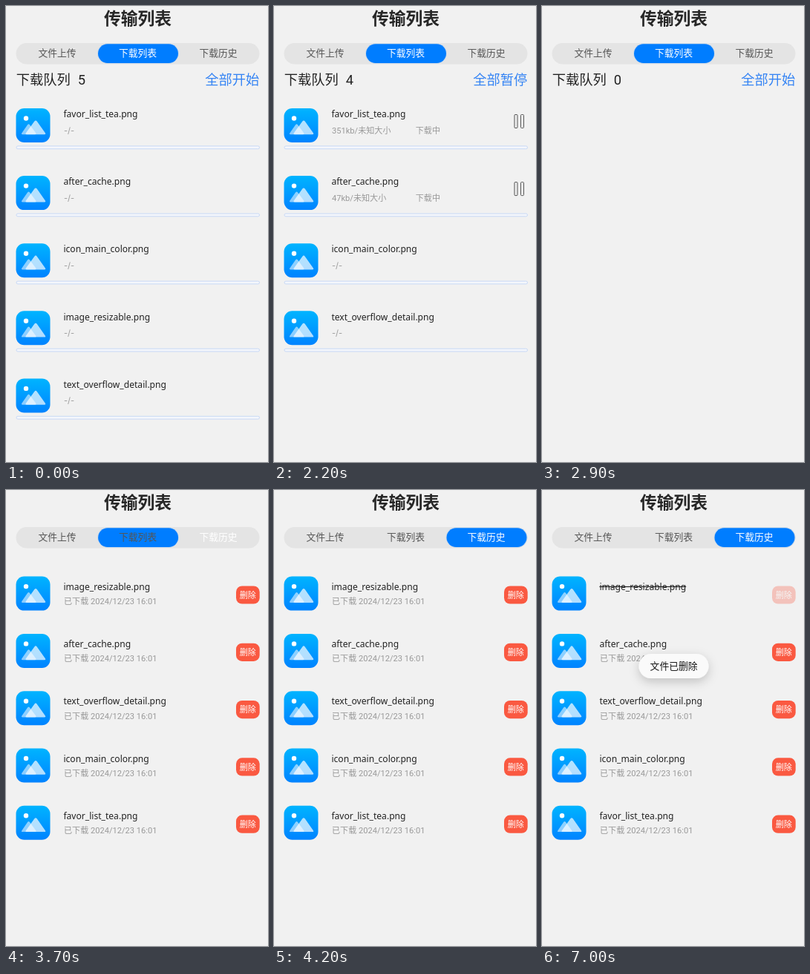
Recreate the animation shown at these times as an HTML page. Size 353 px wide and 615 px high, loop 8 s.

```html
<!DOCTYPE html>
<html lang="zh-CN">
<head>
<meta charset="utf-8">
<title>传输列表</title>
<style>
  html, body { margin: 0; width: 100%; height: 100%; overflow: hidden; background: #f1f1f1; }
  svg { display: block; width: 100%; height: 100%; font-family: Roboto, "Noto Sans CJK SC", "Noto Sans CJK", sans-serif; }
  text { white-space: pre; }
  .title { font-size: 22.8px; font-weight: 700; fill: #272727; }
  .tab { font-size: 12.8px; fill: #555; }
  .on { font-weight: 500; fill: #fff; }
  .head { font-size: 18.25px; fill: #222; }
  .link { fill: #3584f4; }
  .name { font: 12.1px "Noto Sans", sans-serif; fill: #222; }
  .gone { text-decoration: line-through; }
  .info { font-size: 11.1px; fill: #999; }
  .idle { font-family: Inter, sans-serif; }
  .del { font-size: 11px; font-weight: 500; fill: #fff; }
  .toast { font-size: 12.8px; fill: #151515; }
  .mid { text-anchor: middle; }
</style>
</head>
<body>
<svg viewBox="0 0 353 615">
  <defs>
    <linearGradient id="sky" x2="0" y2="1">
      <stop stop-color="#00b4ff"/>
      <stop offset="1" stop-color="#0083ff"/>
    </linearGradient>
    <filter id="lift" x="-40%" y="-100%" width="180%" height="300%">
      <feDropShadow dx="0" dy="4.5" stdDeviation="7" flood-opacity=".2"/>
    </filter>
    <g id="pic">
      <rect width="46" height="46" rx="11" fill="url(#sky)"/>
      <circle cx="13.5" cy="13.5" r="3.2" fill="#fff"/>
      <path d="M9 35.300q-2.600 0-1-2.200l7.500-10.800q1.500-2 3 0l8 10.800q1.400 2.200-1 2.200z" fill="#fff" opacity=".55"/>
      <path d="M14.500 35.300q-2.600 0-1-2.200l11.300-15.600q1.700-2.200 3.400 0l11 15.600q1.500 2.200-1 2.200z" fill="#fff" opacity=".7"/>
    </g>
    <g id="bar">
      <rect x="14" y="50.900" width="327.500" height="3.800" rx="1.900" fill="#f4f6fb" stroke="#c8d9f6"/>
    </g>
    <g id="pause" fill="none" stroke="#555">
      <rect x="324" y="8.500" width="4" height="18" rx="1"/>
      <rect x="332.500" y="8.500" width="4" height="18" rx="1"/>
    </g>
  </defs>
  <text class="title mid" x="177.500" y="24.900">传输列表</text>
  <rect x="13.500" y="50" width="328" height="28.500" rx="14.250" fill="#e4e4e4"/>
  <rect id="pill" y="51.300" width="108" height="25.600" rx="12.800" fill="#007dff" stroke="#cddbea" stroke-width="2" paint-order="stroke"/>
  <g id="tabs"></g>
  <g id="page"></g>
  <g id="tip"></g>
</svg>
<script>
const LOOP = 8000, STEP = 100;
const START = 1000, ACTIVE = 2000, SWITCH = 3700, EXISTS = 5800, REMOVE = 6900;

const files = [
  { name: 'favor_list_tea.png', kb: 351, from: ACTIVE, to: 2900 },
  { name: 'after_cache.png', kb: 47, from: ACTIVE, to: 2300 },
  { name: 'icon_main_color.png', kb: 112, from: 2400, to: 2700 },
  { name: 'image_resizable.png', kb: 64, from: ACTIVE, to: 2200 },
  { name: 'text_overflow_detail.png', kb: 38, from: 2300, to: 2400 }
];
const finished = [...files].sort((a, b) => a.to - b.to);

const $ = id => document.getElementById(id);
const text = (cls, x, y, s) => `<text class="${cls}" x="${x}" y="${y}">${s}</text>`;
const use = id => `<use href="#${id}"/>`;
const row = (y, body) => `<g transform="translate(0 ${y})"><g transform="translate(13.5 0)">${use('pic')}</g>${body}</g>`;

// cubic ease-in-out with control points (.42, 0) and (.58, 1)
function ease(x) {
  if (x <= 0) return 0;
  if (x >= 1) return 1;
  let lo = 0, hi = 1, u;
  for (let i = 0; i < 20; i++) {
    u = (lo + hi) / 2;
    const bx = 3 * u * (1 - u) * (.42 * (1 - u) + .58 * u) + u ** 3;
    if (bx < x) lo = u; else hi = u;
  }
  return u * u * (3 - 2 * u);
}

function tabs(active) {
  return ['文件上传', '下载列表', '下载历史']
    .map((s, i) => text('tab mid' + (i === active ? ' on' : ''), 69 + i * 108.5, 68.3, s))
    .join('');
}

function queue(t) {
  const left = files.filter(f => t < f.to);
  const running = t >= START && left.length;
  const rows = left.map((f, i) => {
    const status = t < f.from
      ? text('info idle', 78, 34, '-/-')
      : text('info', 78, 34.3, f.kb + 'kb/未知大小') + text('info', 190.7, 34.3, '下载中') + use('pause');
    return row(138 + i * 91.1, text('name', 77.4, 12.2, f.name) + status + use('bar'));
  });
  return text('head', 13.7, 106.4, '下载队列') + text('head', 96.8, 106.4, left.length) +
    text('head link', 268.3, 106.4, running ? '全部暂停' : '全部开始') + rows.join('');
}

function history(t) {
  return finished.map((f, i) => {
    const gone = i === 0 && t >= REMOVE;
    return row(116.6 + i * 77.3,
      text('name' + (gone ? ' gone' : ''), 77.4, 18.2, f.name) +
      (gone ? '' : text('info', 78, 37.6, '已下载 2024/12/23 16:01')) +
      `<g opacity="${gone ? .3 : 1}"><rect x="310" y="12.800" width="31.700" height="24.200" rx="8" fill="#fa5941"/>` +
      text('del mid', 325.8, 29.2, '删除') + '</g>');
  }).join('');
}

function toast(t) {
  if (t < EXISTS) return '';
  return '<rect x="130.500" y="221" width="94" height="33" rx="16.500" fill="#fafafa" filter="url(#lift)"/>' +
    text('toast mid', 177.6, 242.3, t < REMOVE + STEP ? '文件已存在' : '文件已删除');
}

function draw(t) {
  const past = t >= SWITCH;
  $('pill').setAttribute('x', 124 + 108.5 * ease((t - SWITCH + 10) / 450));
  $('tabs').innerHTML = tabs(past ? 2 : 1);
  $('page').innerHTML = past ? history(t) : queue(t);
  $('tip').innerHTML = toast(t);
}

let shown = -1;
const begin = performance.now();
function tick() {
  const t = Math.floor((performance.now() - begin) % LOOP / STEP) * STEP;
  if (t !== shown) draw(shown = t);
  requestAnimationFrame(tick);
}
tick();
</script>
</body>
</html>
```
